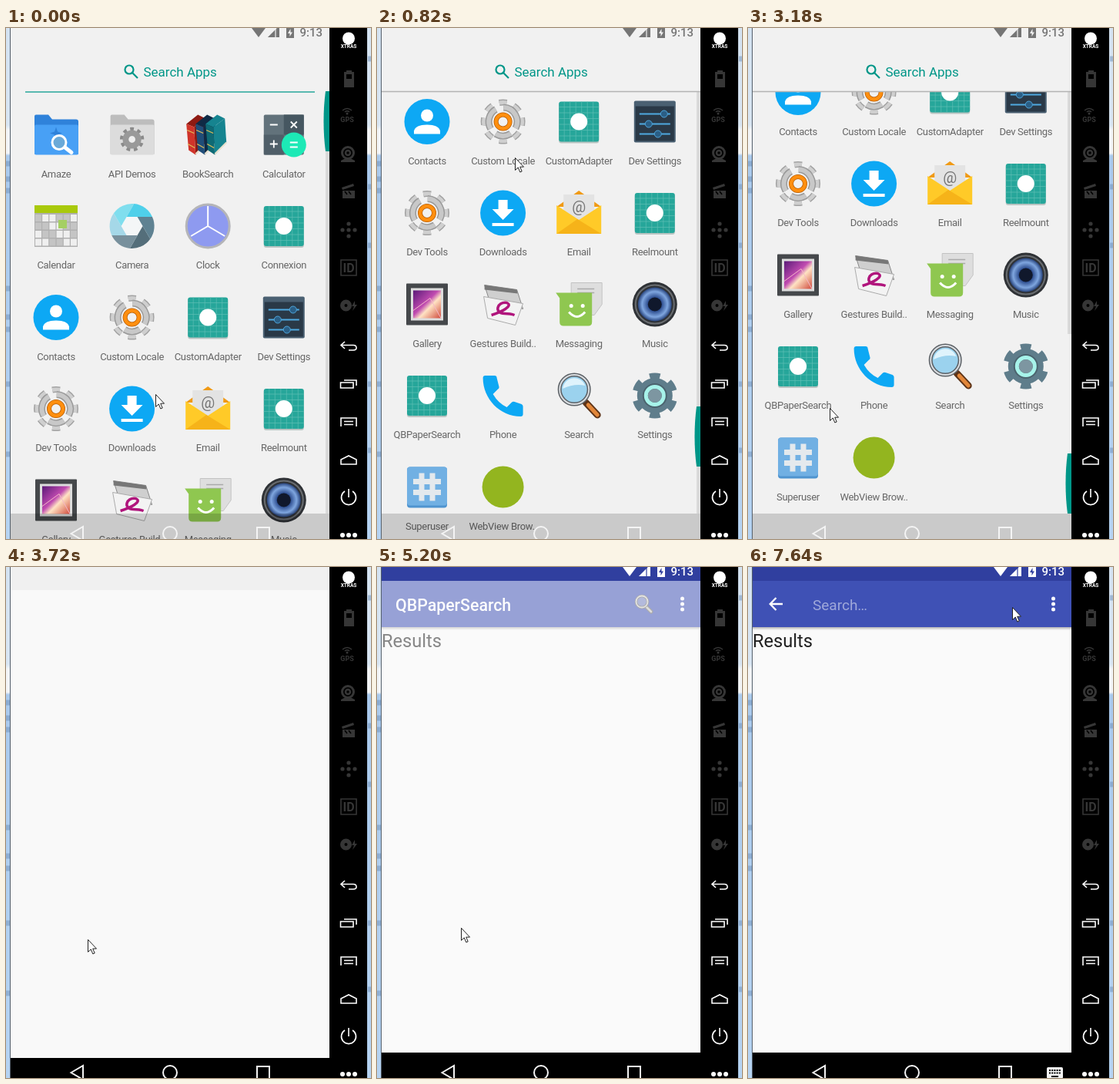
An HTML page that plays this animation: 474 by 663 pixels, repeating every 8 s.

```html
<!DOCTYPE html>
<html lang="en">
<head>
<meta charset="utf-8">
<title>Opening an app from the drawer</title>
<style>
html, body { margin: 0; width: 100%; height: 100%; overflow: hidden; background: #000; }
svg { display: block; font-family: Roboto, "Open Sans", sans-serif; }
.mid { text-anchor: middle; }
.label { font-size: 13px; letter-spacing: -.3px; fill: #666; text-anchor: middle; }
.line { fill: none; stroke: #fff; stroke-width: 1.6; }
.dim { fill: #363636; }
.anim { animation: 8s step-end infinite; }
#list { animation-name: scroll; }
#thumb { animation-name: thumb; }
#rule { animation-name: rule; }
#edge { animation-name: edge; }
#track { animation-name: track; }
#press { animation-name: press; }
#opening { animation-name: opening; }
#app { animation-name: app; }
#bar { animation-name: bar; }
#content { animation-name: content; }
#title { animation-name: title; }
#query { animation-name: query; }
#keys { animation-name: keys; }
#pointer { animation-name: pointer; }

@keyframes scroll {
  0% { transform: translateY(0) }
  1.5% { transform: translateY(-12px) }
  3.25% { transform: translateY(-55px) }
  5% { transform: translateY(-105px) }
  6.75% { transform: translateY(-160px) }
  8.5% { transform: translateY(-210px) }
  10.25% { transform: translateY(-254px) }
  12% { transform: translateY(-280px) }
  14%, 100% { transform: translateY(-292px) }
}
@keyframes thumb {
  0% { transform: translate(413px, 82px) }
  1.5% { transform: translate(413px, 101px) }
  3.25% { transform: translate(413px, 171px) }
  5% { transform: translate(413px, 251px) }
  6.75% { transform: translate(413px, 340px) }
  8.5% { transform: translate(413px, 420px) }
  10.25% { transform: translate(413px, 491px) }
  12% { transform: translate(413px, 533px) }
  14%, 100% { transform: translate(413px, 552px) }
}
@keyframes rule { 0% { opacity: 1 } 1.5%, 100% { opacity: 0 } }
@keyframes edge { 0% { opacity: 0 } 1.5%, 100% { opacity: 1 } }
@keyframes track { 0% { height: 548px } 15.75%, 100% { height: 315px } }
@keyframes press { 0% { opacity: 0 } 38.125% { opacity: .25 } 39.75%, 100% { opacity: 0 } }
@keyframes opening {
  0% { opacity: 0; transform: translateY(60px) }
  43.25% { opacity: .5; transform: translateY(60px) }
  44.875% { opacity: .9; transform: translateY(24px) }
  46.5%, 100% { opacity: 1; transform: translateY(0) }
}
@keyframes app { 0% { opacity: 0 } 48.125%, 100% { opacity: 1 } }
@keyframes bar { 0% { opacity: 0 } 48.125% { opacity: .5 } 49.75%, 100% { opacity: 1 } }
@keyframes content { 0% { opacity: 0 } 65% { opacity: .53 } 66.75%, 100% { opacity: 1 } }
@keyframes title { 0% { opacity: 1 } 92.125%, 100% { opacity: 0 } }
@keyframes query { 0% { opacity: 0 } 92.125% { opacity: .5 } 93.75%, 100% { opacity: 1 } }
@keyframes keys { 0% { opacity: 0 } 95.5%, 100% { opacity: 1 } }
@keyframes pointer {
  0% { transform: translate(194px, 475px) }
  1.5% { transform: translate(194px, 450px) }
  3.25% { transform: translate(191px, 400px) }
  5% { transform: translate(188px, 345px) }
  6.75% { transform: translate(186px, 285px) }
  8.5% { transform: translate(183px, 222px) }
  10.25% { transform: translate(179px, 168px) }
  12% { transform: translate(168px, 290px) }
  14% { transform: translate(150px, 397px) }
  15.75% { transform: translate(138px, 440px) }
  17.375% { transform: translate(128px, 480px) }
  19.125% { transform: translate(120px, 512px) }
  20.875% { transform: translate(117px, 526px) }
  22.5% { transform: translate(115px, 533px) }
  24.25% { transform: translate(110px, 512px) }
  26% { transform: translate(106px, 493px) }
  31% { transform: translate(88px, 474px) }
  32.75% { transform: translate(70px, 454px) }
  34.625% { transform: translate(58px, 442px) }
  39.75% { transform: translate(106px, 493px) }
  43.25% { transform: translate(106px, 490px) }
  44.875% { transform: translate(106px, 486px) }
  46.5% { transform: translate(106px, 483px) }
  49.75% { transform: translate(108px, 475px) }
  51.5% { transform: translate(108px, 468px) }
  57.125% { transform: translate(109px, 468px) }
  70.125% { transform: translate(118px, 430px) }
  71.875% { transform: translate(160px, 300px) }
  73.5% { transform: translate(205px, 159px) }
  75.125% { transform: translate(258px, 85px) }
  76.875% { transform: translate(300px, 40px) }
  78.5% { transform: translate(318px, 21px) }
  80.25% { transform: translate(326px, 38px) }
  81.875% { transform: translate(332px, 53px) }
  83.375% { transform: translate(342px, 52px) }
  86.75%, 100% { transform: translate(343px, 52px) }
}
</style>
</head>
<body>
<svg width="474" height="663" viewBox="0 0 474 663">
  <defs>
    <clipPath id="screen"><path d="M6 0H420V663H6z"/></clipPath>
    <clipPath id="below"><path d="M6 83H420V663H6z"/></clipPath>
    <linearGradient id="desk" x2="0" y2="1">
      <stop offset="0" stop-color="#d3e2f1"/><stop offset=".19" stop-color="#d8e5f2"/>
      <stop offset=".2" stop-color="#f2f4f6"/><stop offset=".245" stop-color="#f2f4f6"/>
      <stop offset=".25" stop-color="#a9c9ec"/><stop offset="1" stop-color="#b5d3f2"/>
    </linearGradient>
    <linearGradient id="shade" x2="0" y2="1">
      <stop offset="0" stop-color="#000" stop-opacity=".28"/><stop offset="1" stop-color="#000" stop-opacity="0"/>
    </linearGradient>
    <linearGradient id="sunset" x2="1" y2="1">
      <stop offset="0" stop-color="#5b1a78"/><stop offset=".45" stop-color="#c04bb0"/>
      <stop offset=".6" stop-color="#ffe3c4"/><stop offset="1" stop-color="#d04a3c"/>
    </linearGradient>
    <radialGradient id="cone">
      <stop offset="0" stop-color="#16264d"/><stop offset=".4" stop-color="#2c4c8e"/>
      <stop offset=".75" stop-color="#7fa6df"/><stop offset="1" stop-color="#27437c"/>
    </radialGradient>
    <g id="status" fill="currentColor">
      <path d="M319 0H337L328 12z"/>
      <path d="M355 -3V12H340z" opacity=".4"/><path d="M349 3V12H340zM351 1L355 -3V12H351z"/>
      <path fill-rule="evenodd" d="M364 0H374V13H364zM369.5 1L366 7H368.5V11L372 5.500H369.500z"/>
      <text x="381.500" y="11" font-size="15" font-weight="500">9:13</text>
    </g>
    <g id="nav" fill="none" stroke="#f4f4f4" stroke-width="2">
      <path d="M84.500 656L100 647V665zM326 648H342V664H326z"/><circle cx="213" cy="656" r="9"/>
    </g>
  </defs>

  <path d="M0 0H6V663H0zM469 0H474V663H469z" fill="url(#desk)"/>
  <path d="M0 176H5M0 196H5M0 211H5M0 338H5M0 375H5M0 391H5M0 462H5M0 553H5M470 40H474M470 206H474M470 282H474M470 462H474M470 548H474" stroke="#6d8fb8" stroke-width="7" opacity=".5"/>
  <path d="M5.500 0V663" stroke="#55606c"/>

  <g clip-path="url(#screen)">
    <path d="M6 0H420V663H6z" fill="#f1f1f1"/>
    <use href="#status" color="#757575"/>
    <g fill="none" stroke="#009688" stroke-width="2.200">
      <circle cx="160" cy="54" r="5.500"/><path d="M164 58L171 65"/>
    </g>
    <text x="178.500" y="63" font-size="17" fill="#009688">Search Apps</text>
    <rect id="track" class="anim" x="415" y="82" width="5" height="548" fill="#dadada"/>
    <g clip-path="url(#below)"><g id="list" class="anim"></g></g>
    <path id="rule" class="anim" d="M25 83H401" stroke="#26a69a" stroke-width="1.500"/>
    <path id="edge" class="anim" d="M6 82.500H420" stroke="#b4b4b4" stroke-width="1.500"/>
    <rect id="press" class="anim" x="39" y="412" width="52" height="52" rx="3"/>
    <path d="M6 630H420V663H6z" opacity=".16"/>
    <path id="thumb" class="anim" d="M7 0H2Q-.500 18 -.500 39T2 78H7z" fill="#009688"/>
    <use href="#nav"/>

    <g id="opening" class="anim">
      <path d="M6 0H420V30H6z" fill="#f0f0f0"/>
      <path d="M6 30H420V637H6z" fill="#f9f9f9"/>
      <path d="M6 637H420V740H6z"/>
      <use href="#nav"/>
    </g>

    <g id="app" class="anim">
      <path d="M6 0H420V630H6z" fill="#fafafa"/>
      <path d="M6 630H420V663H6z"/>
      <use href="#nav"/>
      <g id="bar" class="anim">
        <path d="M6 0H420V18H6z" fill="#303f9f"/>
        <use href="#status" color="#fff"/>
      </g>
      <g id="content" class="anim">
        <path d="M6 18H420V78H6z" fill="#3f51b5"/>
        <path d="M6 78H420V82H6z" fill="url(#shade)"/>
        <text x="6" y="104" font-size="23.600" fill="#212121">Results</text>
        <g id="title" class="anim">
          <text x="24" y="57" font-size="21.300" font-weight="500" fill="#fff">QBPaperSearch</text>
          <g fill="none" stroke-linecap="round">
            <path d="M350 52L356 58" stroke="#666" stroke-width="5"/>
            <path d="M350 52L356 58" stroke="#c4c4c4" stroke-width="2.500"/>
            <circle cx="344" cy="45" r="7.500" stroke="#666" stroke-width="3.500" fill="#7480c0"/>
            <circle cx="344" cy="45" r="7.500" stroke="#ccc" stroke-width="1.800"/>
          </g>
        </g>
        <g id="query" class="anim">
          <path d="M45 48H29M36.500 40L28.700 48L36.500 56" fill="none" stroke="#fff" stroke-width="2.300"/>
          <text x="84" y="56" font-size="19" fill="#fff" opacity=".5">Search…</text>
        </g>
        <g fill="#fff"><circle cx="396.500" cy="41" r="2.500"/><circle cx="396.500" cy="48" r="2.500"/><circle cx="396.500" cy="55" r="2.500"/></g>
      </g>
      <g id="keys" class="anim">
        <rect x="388" y="649" width="21" height="15" rx="2" fill="#f4f4f4"/>
        <path d="M391 653H407M391 656.500H407" stroke="#000" stroke-width="2" stroke-dasharray="2 1.200"/>
        <path d="M394 661H403" stroke="#000" stroke-width="2"/>
      </g>
    </g>
  </g>

  <path d="M420 0H469V663H420z"/>
  <circle cx="445" cy="13.500" r="8" fill="#fff"/>
  <text class="mid" x="445" y="26" font-size="6.500" font-weight="700" fill="#fff">XTRAS</text>
  <g class="dim">
    <path fill-rule="evenodd" d="M442 55H449V57H452V77H439V57H442zM442 60V66H449V60z"/>
    <text class="mid" x="443" y="122" font-size="9" font-weight="700">GPS</text>
    <circle cx="443" cy="111" r="1.500"/>
    <path d="M435 172Q444 166 453 172V174H435z"/>
    <path d="M437 211H453V221H437zM436 207L451 202L452 205L437 210z"/>
    <circle cx="445" cy="262" r="2.600"/><circle cx="445" cy="254" r="2.600"/><circle cx="445" cy="270" r="2.600"/><circle cx="437" cy="262" r="2.600"/><circle cx="453" cy="262" r="2.600"/>
    <text class="mid" x="445" y="317" font-size="16" font-weight="700">ID</text>
    <path fill-rule="evenodd" d="M434 360a7.500 7.500 0 1 0 15 0a7.500 7.500 0 1 0-15 0M439.500 360a2 2 0 1 0 4 0a2 2 0 1 0-4 0"/>
    <path d="M453 354L449 361H452L450 367L456 359H453z"/>
    <g fill="none" stroke="#363636" stroke-width="1.600">
      <path d="M440 109Q443 106.500 446 109M437 107Q443 102 449 107"/>
      <circle cx="444" cy="162" r="7.500" stroke-width="3"/><circle cx="444" cy="162" r="3" stroke-width="2.500"/>
      <path d="M435 301H455V321H435z"/>
    </g>
    <path d="M440 212L443 216M445 212L448 216" stroke="#000" stroke-width="1.500"/>
  </g>
  <g class="line">
    <path d="M440 407L435 411.500L440 416M435 411.500H451Q455 411.500 455 415Q455 418 451 418H445"/>
    <path d="M434.500 460H451V467H434.500zM439 457H455V464"/>
    <path d="M435 517V506H455V517M439 510.500H451M439 514.500H451"/>
    <path d="M435 566V560L445 555L455 560V566z"/>
    <path d="M440 601A9.500 9.500 0 1 0 450 601M445 598V609"/>
  </g>
  <g fill="#fff"><circle cx="437" cy="658" r="3"/><circle cx="445" cy="658" r="3"/><circle cx="453" cy="658" r="3"/></g>

  <path id="pointer" class="anim" d="M.500 .500V16.500L4.300 13L6.800 19L9.200 18L6.700 12.200H11.500z" fill="#fff" stroke="#222"/>
</svg>
<script>
const path = (d, fill, more = '') => `<path d="${d}" fill="${fill}" ${more}/>`;
const rect = (x, y, w, h, fill, more = '') =>
  `<rect x="${x}" y="${y}" width="${w}" height="${h}" fill="${fill}" ${more}/>`;
const disc = (x, y, r, fill, more = '') => `<circle cx="${x}" cy="${y}" r="${r}" fill="${fill}" ${more}/>`;
const ring = (x, y, r, color, w, more = '') => disc(x, y, r, 'none', `stroke="${color}" stroke-width="${w}" ${more}`);
const stroke = (d, color, w = 2, more = '') => path(d, 'none', `stroke="${color}" stroke-width="${w}" ${more}`);
// Evenly spaced teeth, the first one pointing straight up.
const teeth = (r, color, w, n) => ring(0, 0, r, color, w,
  `pathLength="${2 * n}" stroke-dasharray="1" transform="rotate(${-90 - 90 / n})"`);

const folder = (back, front) =>
  path('M-28 -24Q-28 -26 -26 -26H-10L-5 -20H26Q29 -20 29 -17V25H-28z', back) +
  rect(-28, -13, 57, 39, front, 'rx="2"');

const plainApp = () => {
  let grid = '';
  for (let i = -19; i < 26; i += 7.5) grid += `M${i} -26V26M-26 ${i}H26`;
  return rect(-26, -25, 52, 53, '#b9c4c2', 'rx="3"') + rect(-26, -26, 52, 52, '#26a69a', 'rx="3"') +
    stroke(grid, '#5fbfb5', .7) + disc(0, 0, 11, '#fff');
};

// A broken gear: three arcs of rim and teeth around an orange ring.
const cog = () => {
  const arcs = 'pathLength="100" stroke-dasharray="25 9 32 8 18 8" transform="rotate(150)"';
  return teeth(25, '#a2a2a2', 8, 8) + teeth(25, '#cfcfcf', 5, 8) +
    ring(0, 0, 18.5, '#9a9a9a', 9, arcs) + ring(0, 0, 18.5, '#c8c8c8', 6, arcs) +
    ring(0, 0, 9, '#b55a00', 6) + ring(0, 0, 9, '#ff8f0f', 4.5);
};

const book = (x, cover, spine) =>
  path(`M${x + 10} -10l15 -11l2 31l-15 16z`, cover) + path(`M${x} -14l15 -12l10 5l-15 11z`, cover) +
  path(`M${x} -14l10 4l2 36l-9 -6z`, spine) + stroke(`M${x + 1} -6l9 4M${x + 2} 12l9 5`, '#e0bd55', 1.3) +
  stroke(`M${x + 12} 25l15 -15`, '#e8e0cc', 2);

// Blades run from each hexagon corner along its edge out to the rim.
const aperture = () => {
  const colors = ['#546e7a', '#78909c', '#a5d8e8', '#80deee', '#4fd0ea', '#5f8292'];
  const inner = 14, outer = 29, side = Math.sqrt(outer ** 2 - inner ** 2 * .75) - inner / 2;
  const polar = (r, k) => [r * Math.cos(k * Math.PI / 3), r * Math.sin(k * Math.PI / 3)];
  const corner = k => polar(inner, k);
  const rim = k => {
    const [x, y] = corner(k), [dx, dy] = polar(side, k + 1);
    return [x + dx, y + dy];
  };
  return disc(0, 0, 28, '#f4f6f7') + colors.map((c, k) =>
    path(`M${corner(k)}L${rim(k)}A29 29 0 0 1 ${rim(k + 1)}L${corner(k + 1)}z`, c)).join('');
};

const calendar = () => {
  let cells = '';
  for (let r = 0; r < 4; r++) for (let c = 0; c < 6; c++)
    cells += rect(-27 + c * 9.2, -15 + r * 10.5, 8, 9, (r * 5 + c * 3) % 4 < 2 ? '#c4c4c4' : '#efefef');
  return rect(-28, -26, 56, 53, '#b0b0b0') + cells + rect(-28, -27, 56, 10, '#a9c90c') + rect(3, -8, 11, 11, '#a5cf63');
};

const slider = (y, x) => stroke(`M-20 ${y}H20`, '#4fa9e0', 2) + disc(x, y, 4.5, '#2b5f86', 'stroke="#4fa6dc"');

const icons = {
  'Amaze': () => folder('#2f82da', '#48a0f5') + path('M0 -10L2 -4L8 -2L2 0L0 6L-2 0L-8 -2L-2 -4z', '#2f82da') +
    stroke('M11 16L20 23', '#fff', 5, 'stroke-linecap="round"') + disc(4, 10, 9, '#6aa9d8', 'stroke="#fff" stroke-width="3"'),
  'API Demos': () => folder('#bdbdbd', '#dcdcdc') + `<g transform="translate(0 6) scale(.55)">${
    teeth(24, '#8b8b8b', 9, 9) + ring(0, 0, 15, '#999', 14)}</g>` + disc(0, 6, 4, '#eee'),
  'BookSearch': () => book(-28, '#8e1a12', '#d0342a') + book(-16, '#0f2a45', '#1f4d78') + book(-3, '#168490', '#0f6a75'),
  'Calculator': () => rect(-26, -26, 52, 52, '#62727b', 'rx="2"') + rect(0, -26, 26, 26, '#465761') + rect(-26, 0, 26, 26, '#505f69') +
    stroke('M-18 -13H-8M-18 12H-8M-13 7V17M9 -17L17 -9M17 -17L9 -9', '#fff', 1.8) + disc(13, 13, 16, '#1de9b6') + stroke('M8 10H18M8 16H18', '#fff', 2),
  'Calendar': calendar,
  'Camera': aperture,
  'Clock': () => disc(0, 0, 28, '#8e9af0', 'stroke="#b5b5b8" stroke-width="3"') + stroke('M0 -26V0L-22 13M0 0L22 13', '#fff', 2),
  'Connexion': plainApp,
  'Contacts': () => disc(0, 0, 29.5, '#0da8f4') + disc(0, -8, 8, '#fff') + path('M-17 16V12Q-15 4 0 4T17 12V16z', '#fff'),
  'Custom Locale': cog,
  'CustomAdapter': plainApp,
  'Dev Settings': () => rect(-27, -27, 54, 54, '#4a6072', 'rx="2"') + rect(-25, -20, 50, 45, '#2a3947') + slider(-10, 12) + slider(3, -8) + slider(16, 4),
  'Dev Tools': cog,
  'Downloads': () => disc(0, 0, 29.5, '#0da8f4') + path('M-6 -17H6V-5H14L0 9L-14 -5H-6zM-14 13H14V17H-14z', '#fff'),
  'Email': () => path('M-29 -8L0 -29L29 -8z', '#f09a15') + rect(-20, -24, 40, 37, '#e3e3e3') +
    '<text class="mid" y="-1" font-size="20" fill="#757575">@</text>' +
    path('M-29 -10L0 9L29 -10V27H-29z', '#ffca28') + path('M-29 27L-2 8L29 27z', '#f6b319'),
  'Reelmount': plainApp,
  'Gallery': () => rect(-27, -27, 54, 54, '#45484b', 'rx="1"') + rect(-21, -21, 42, 42, '#ddd') + rect(-18, -18, 36, 36, 'url(#sunset)') + stroke('M-18 8L4 -8L18 18', '#f5b7c7', 1),
  'Gestures Build..': () => path('M-24 -25L18 -19L26 6L-18 -6z', '#cfcfcf', 'stroke="#888"') + path('M-25 -10L26 -1L16 27L-20 18z', '#f3f3f3', 'stroke="#aaa"') +
    path('M-24 -25L18 -19L19 -14L-24 -19z', '#777') + stroke('M-15 14C-2 10 14 2 5 -2C-8 -4 -12 12 2 12Q10 12 15 14', '#b0157c', 3.5),
  'Messaging': () => path('M-10 -28H30V0L20 14H-10z', '#dedede', 'stroke="#c2c2c2"') + stroke('M-2 -20H20M-2 -15H20', '#aaa', 1.5) +
    path('M-30 -15H17V23Q17 28 12 28H-20Q-25 28 -25 23V-8z', '#8fc750') + disc(-10, 2, 2.5, '#fff') + disc(5, 2, 2.5, '#fff') + stroke('M-13 10Q-2.500 22 8 10', '#fff', 3),
  'Music': () => disc(0, 0, 29, '#2f3236') + ring(0, 0, 25, '#6a6d70', 2) + disc(0, 0, 22, 'url(#cone)') + disc(0, 0, 9, '#10182c'),
  'QBPaperSearch': plainApp,
  'Phone': () => path('M-23 -26H-11Q-8 -26 -8 -23L-5 -11Q-5 -9 -7 -8L-13 -2Q-6 10 5 15L11 9Q13 7 15 8L24 11Q26 12 26 14V24Q26 27 23 27C-4 27 -26 4 -26 -23Q-26 -26 -23 -26z', '#0da8f4'),
  'Search': () => stroke('M9 9L24 25', '#5e3418', 9, 'stroke-linecap="round"') + stroke('M12 12L24 25', '#e2873a', 5, 'stroke-linecap="round"') +
    disc(-6, -8, 19, '#9bd2ee', 'stroke="#5c6166" stroke-width="5"') + ring(-6, -8, 19, '#d9dcdf', 2) + path('M-21 -9A15 15 0 0 1 8 -13Q-6 -16 -21 -9z', '#dff3fc'),
  'Settings': () => teeth(25, '#5f7d8b', 9, 6) + disc(0, 0, 23, '#5f7d8b') + disc(0, 0, 16, '#4b636e') + ring(0, 0, 11.5, '#a7f3ea', 5) + disc(0, 0, 9, '#7d96a1'),
  'Superuser': () => rect(-26, -26, 52, 53, '#4f94cf', 'rx="4"') + rect(-26, -26, 52, 50, '#71b0e3', 'rx="4"') + stroke('M-7 -18V18M7 -18V18M-18 -7H18M-18 7H18', '#e4e9ed', 7),
  'WebView Brow..': () => disc(0, 0, 27, '#93b51f'),
};

document.getElementById('list').innerHTML = Object.entries(icons).map(([name, draw], i) => {
  const x = 65 + 98.6 * (i % 4), y = 138.5 + 118.5 * Math.floor(i / 4);
  return `<g transform="translate(${x} ${y})">${draw()}<text class="label" y="55">${name}</text></g>`;
}).join('');
</script>
</body>
</html>
```
